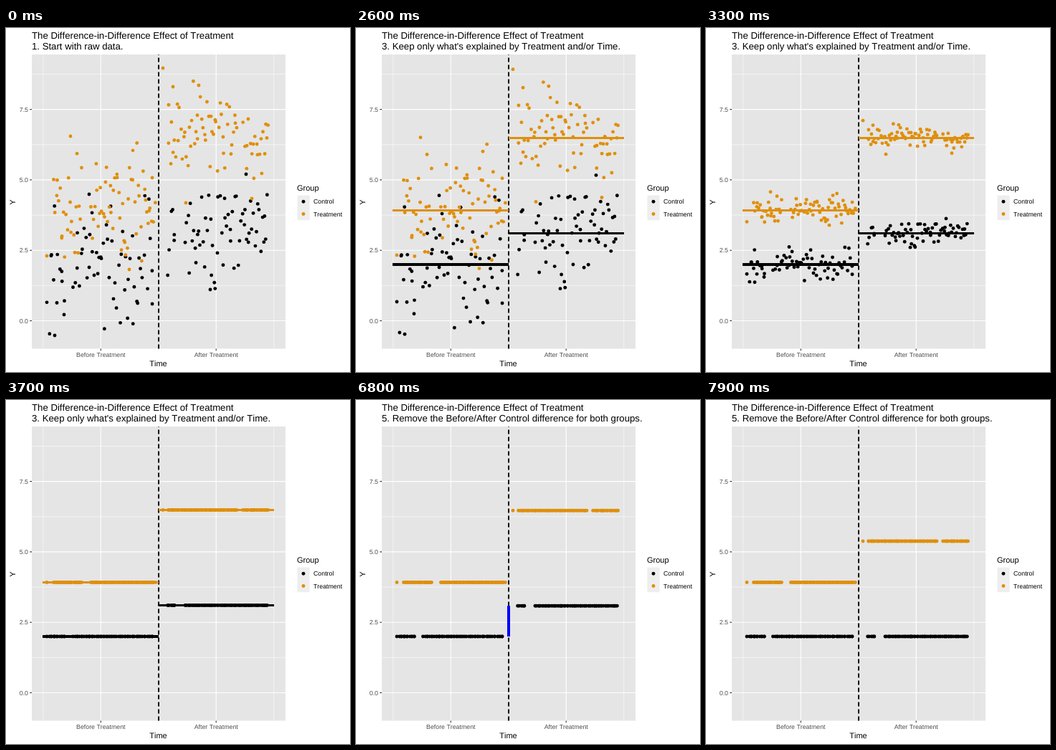
These frames come from a looping animation (480x480 px, 8000 ms). An HTML page:

```html
<!DOCTYPE html>
<html lang="en">
<head>
<meta charset="utf-8">
<title>Difference in difference</title>
<style>
  html, body { margin: 0; width: 100%; height: 100%; overflow: hidden; background: #fff; }
  svg { display: block; width: 480px; height: 480px; font: 11px "Liberation Sans", Arial, sans-serif; }
  text { text-rendering: geometricPrecision; font-kerning: none; }
  .title { font-size: 13.2px; }
  .small { font-size: 8.8px; }
  .axis { fill: #4d4d4d; }
  .middle { text-anchor: middle; }
  .control { fill: #000; }
  .treated { fill: #df8f0c; }
</style>
</head>
<body>
<svg viewBox="0 0 480 480">
  <text class="title" x="36" y="15">The Difference-in-Difference Effect of Treatment</text>
  <text class="title" x="36" y="30" id="step"></text>

  <rect x="36" y="37" width="354" height="410.5" fill="#e5e5e5"/>
  <g id="grid"></g>
  <g id="dots"></g>
  <path d="M213 447.5V37" stroke="#000" stroke-width="2" stroke-dasharray="6 4"/>
  <g id="means"></g>
  <path id="gap" stroke="#00f" stroke-width="4"/>

  <text class="middle" x="212.5" y="472">Time</text>
  <text class="middle" transform="translate(13 243) rotate(-90)">Y</text>

  <text x="406" y="227">Group</text>
  <path d="M406.4 233.6h17.3v34.6h-17.3z" fill="#eee"/>
  <circle class="control" cx="415" cy="242.2" r="2.45"/>
  <circle class="treated" cx="415" cy="259.5" r="2.45"/>
  <text class="small" x="429" y="245">Control</text>
  <text class="small" x="429" y="263">Treatment</text>
</svg>

<script>
const LOOP = 8000, FRAME = 100;
const byId = id => document.getElementById(id);

function add(parent, tag, attrs, text = "") {
  const el = document.createElementNS("http://www.w3.org/2000/svg", tag);
  for (const key in attrs) el.setAttribute(key, attrs[key]);
  el.textContent = text;
  return parent.appendChild(el);
}

// Axes and grid
const grid = byId("grid");
const rule = (d, width, stroke = "#fff") => add(grid, "path", { d, stroke, "stroke-width": width });
const yOf = value => 408.5 - value * 39.32;

for (const x of [51.8, 373.8]) rule(`M${x} 37V447.5`, 0.55);
for (let v = 1.25; v < 9; v += 2.5) rule(`M36 ${yOf(v)}H390`, 0.55);
for (let v = 0; v < 8; v += 2.5) {
  const y = yOf(v);
  rule(`M36 ${y}H390`, 1.1);
  rule(`M33.2 ${y}H36`, 1.1, "#333");
  add(grid, "text", { class: "small axis", x: 31, y: y + 3, "text-anchor": "end" }, v.toFixed(1));
}
["Before", "After"].forEach((when, i) => {
  const x = 132.3 + i * 160.9;
  rule(`M${x} 37V447.5`, 1.1);
  rule(`M${x} 447.5V450.3`, 1.1, "#333");
  add(grid, "text", { class: "small axis middle", x, y: 459 }, `${when} Treatment`);
});

// Each group fills the spans of x around its mean; far holds its extreme points
const BASE = 330, CONTROL_AFTER = 286.5;
const groups = [
  { kind: "control", mean: BASE, count: 66, spread: 78,
    spans: [[57, 82], [93, 206]], far: [[68, 429], [81, 400], [116, 232]] },
  { kind: "control", mean: CONTROL_AFTER, after: true, count: 66, spread: 70,
    spans: [[225, 237], [249, 366]], far: [[335, 204], [285, 365]] },
  { kind: "treated", mean: 254.5, count: 78, spread: 74,
    spans: [[66, 106], [117, 209]], far: [[90, 151], [57, 318], [172, 337]] },
  { kind: "treated", mean: 153.5, after: true, count: 74, spread: 66,
    spans: [[225, 323], [330, 367]], far: [[219, 56], [233, 82], [251, 244], [343, 238]] }
];

let seed = 41;
const random = () => (seed = (seed * 16807) % 2147483647) / 2147483647;

function along([[a, b], [c, d]], share) {
  const x = a + share * (b - a + d - c);
  return x < b ? x : x + c - b;
}

const dots = [];
for (const group of groups) {
  const { kind, mean, after, count, spread, spans, far } = group;
  const points = [...far];
  for (let i = 0; i < count; i++) {
    const x = along(spans, (i + random()) / count);
    points.push([x, mean + spread * (random() + random() + random() - 1.5)]);
  }
  for (const [x, y] of points) {
    const el = add(byId("dots"), "circle", { class: kind, cx: x, r: 2.45 });
    dots.push({ el, y, group });
  }
  // Mean lines cover whole pixels
  const top = Math.floor(mean - 1.4), height = Math.ceil(mean + 1.4) - top;
  add(byId("means"), "rect", { class: kind, x: after ? 213 : 51, y: top, width: after ? 161 : 162, height });
}

// Timeline
const steps = [
  [0, "1. Start with raw data."],
  [500, "2. Figure out what differences in Y are explained by Treatment and/or Time."],
  [2600, "3. Keep only what's explained by Treatment and/or Time."],
  [4700, "4. See how Control changed over Time."],
  [6800, "5. Remove the Before/After Control difference for both groups."]
];

function ease(time, from, to) {
  const p = Math.min(1, Math.max(0, (time - from) / (to - from)));
  return (1 - Math.cos(Math.PI * p)) / 2;
}

const show = (id, on) => byId(id).setAttribute("visibility", on ? "visible" : "hidden");

function draw(time) {
  const gather = ease(time, 2500, 3700);
  const drop = (BASE - CONTROL_AFTER) * ease(time, 6700, 7900);

  for (const { el, y, group } of dots) {
    el.setAttribute("cy", y + (group.mean - y) * gather + (group.after ? drop : 0));
  }
  byId("step").textContent = steps.filter(([start]) => time >= start).pop()[1];
  byId("gap").setAttribute("d", `M213 ${CONTROL_AFTER + drop}V${BASE}`);
  show("means", time >= 900 && time < 4700);
  show("gap", time >= 5100 && time < 7900);
}

let last = -1;
function tick() {
  const time = Math.floor((performance.now() % LOOP) / FRAME) * FRAME;
  if (time !== last) draw(last = time);
  requestAnimationFrame(tick);
}
tick();
</script>
</body>
</html>
```
